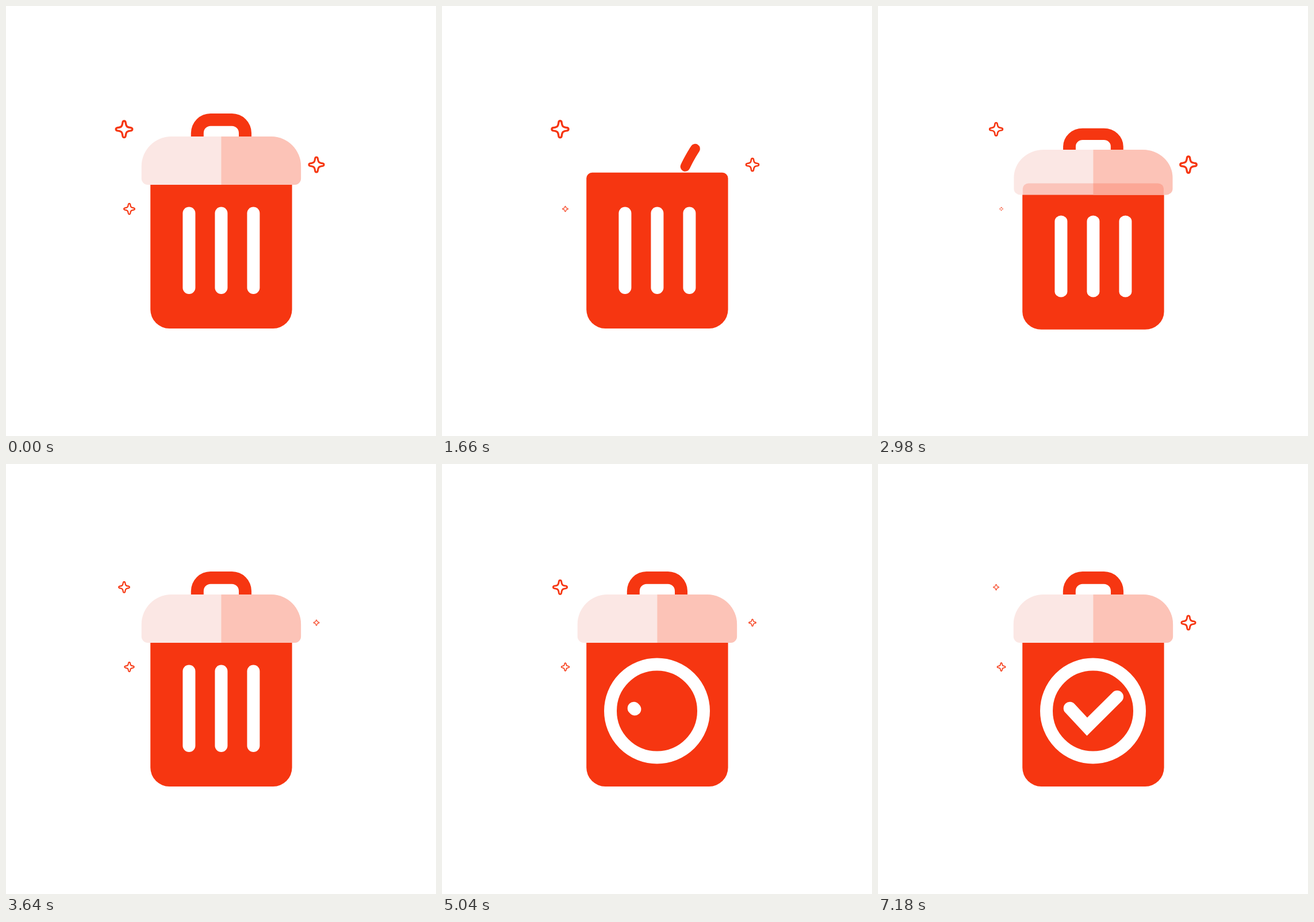
An HTML page with a canvas that plays this animation: 748 px wide and 748 px high, repeating every 7200 ms.

```html
<!DOCTYPE html>
<html lang="en">
<head>
<meta charset="utf-8">
<title>Bin</title>
<style>
html, body { margin: 0; width: 100%; height: 100%; overflow: hidden; background: #fff; }
canvas { display: block; }
</style>
</head>
<body>
<canvas id="stage" width="748" height="748"></canvas>
<script>
const ctx = document.getElementById('stage').getContext('2d');
const LOOP = 7200, RED = '#f63611', WHITE = '#fff';
const MID = 374.4;

const clamp = v => Math.max(0, Math.min(1, v));
const span = (t, a, b) => clamp((t - a) / (b - a));
const lerp = (a, b, p) => a + (b - a) * p;
const smooth = p => p * p * (3 - 2 * p);
const easeOut = p => 1 - (1 - p) ** 3;

// Linear pulse between two sizes, largest at "peak"
function pulse(t, peak, period, min, max) {
  const d = Math.abs((((t - peak) / period + 0.5) % 1 + 1) % 1 - 0.5) * 2;
  return lerp(max, min, d);
}

function stroke(color, width, cap = 'round') {
  ctx.strokeStyle = color;
  ctx.lineWidth = width;
  ctx.lineCap = cap;
  ctx.stroke();
}

function sparkle(x, y, size) {
  ctx.save();
  ctx.translate(x, y);
  ctx.scale(size / 16.5, size / 16.5);
  ctx.beginPath();
  ctx.moveTo(2.6, -12.4);
  for (let i = 0; i < 4; i++) {
    const a = i * Math.PI / 2, c = Math.cos(a), s = Math.sin(a);
    const curve = (...p) => {
      const q = [];
      for (let k = 0; k < 6; k += 2) q.push(p[k] * c - p[k + 1] * s, p[k] * s + p[k + 1] * c);
      ctx.bezierCurveTo(...q);
    };
    curve(3.6, -4.8, 4.8, -3.6, 12.4, -2.6);
    curve(15.6, -2, 15.6, 2, 12.4, 2.6);
  }
  ctx.closePath();
  stroke(RED, 3.5);
  ctx.restore();
}

function sparkles(t) {
  sparkle(205.5, 214.3, pulse(t, 40, 1600, 4.5, 16.5));
  sparkle(540, 276, pulse(t, 1325, 1530, 5, 18));
  sparkle(214.5, 353, t < 660 ? 10.5 : pulse(t, 2220, 1560, 3.3, 10.5));
}

function bodyPath() {
  ctx.beginPath();
  ctx.roundRect(251.2, 289.7, 246.4, 271.3, [10, 10, 33, 33]);
}

function lidPath() {
  ctx.beginPath();
  ctx.roundRect(235.7, 227, 277.4, 84, [52, 52, 11, 11]);
}

function handle() {
  ctx.beginPath();
  ctx.roundRect(321.8, 187, 105.2, 40.3, [34, 34, 0, 0]);
  ctx.roundRect(343.8, 208.7, 61.2, 18.6, [12, 12, 0, 0]);
  ctx.fillStyle = RED;
  ctx.fill('evenodd');
}

function lid(t) {
  if (t > 720 && t < 2740) return;
  const leaving = t < 1500;
  const size = leaving ? 1 : easeOut(span(t, 2740, 3030));
  const tint = leaving ? 0 : clamp((3060 - t) / 400);
  ctx.save();
  ctx.save();
  if (leaving) {
    ctx.globalAlpha = 1 - span(t, 400, 720);
    ctx.translate(0, -49 * smooth(span(t, 60, 560)));
  }
  ctx.translate(MID, 311);
  ctx.scale(size, size);
  ctx.translate(-MID, -311);
  handle();
  lidPath();
  ctx.fillStyle = '#fbe7e4';
  ctx.fill();
  ctx.clip();
  ctx.fillStyle = '#fcc3b7';
  ctx.fillRect(MID, 220, 150, 100);
  if (tint > 0) {
    ctx.globalAlpha = tint;
    bodyPath();
    ctx.fillStyle = RED;
    ctx.fill();
  }
  ctx.restore();
  ctx.restore();
}

// Part of a quadratic curve that runs from a to b along it
function trail(t, start, pts) {
  const p = (t - start) / 600;
  if (p <= 0 || p >= 1) return;
  const a = clamp(p * 1.3 - 0.3), b = clamp(p * 1.3);
  const at = (u, k) => (1 - u) ** 2 * pts[k] + 2 * u * (1 - u) * pts[k + 2] + u * u * pts[k + 4];
  ctx.beginPath();
  for (let i = 0; i <= 16; i++) {
    const u = lerp(a, b, i / 16);
    ctx.lineTo(at(u, 0), at(u, 1));
  }
  stroke(RED, 17);
}

function trails(t) {
  for (const wave of [0, 700]) {
    trail(t, 1046 + wave, [372, 210, 372, 255, 372, 300]);
    trail(t, 1280 + wave, [476, 208, 439, 238, 414, 300]);
  }
}

function bar(x) {
  ctx.beginPath();
  ctx.moveTo(x, 360.5);
  ctx.lineTo(x, 490);
  stroke(WHITE, 22);
}

function emblem(t) {
  const open = smooth(span(t, 4140, 4540));
  if (open === 0) {
    const gap = 56 * (1 - smooth(span(t, 3800, 4140)));
    for (const k of [-1, 0, 1]) bar(MID + k * gap);
    return;
  }
  const grow = smooth(span(t, 4620, 5000));
  const r = lerp(64.6, 81, grow);
  ctx.beginPath();
  ctx.ellipse(374, lerp(425.2, 429.5, open), r * open, r, 0, 0, Math.PI * 2);
  stroke(WHITE, 22);
  if (open === 1 && grow === 0) {
    ctx.fillStyle = WHITE;
    ctx.fillRect(363, 353.9, 11, 10);
  }
  const drawn = smooth(span(t, 5000, 5480));
  if (drawn > 0) {
    ctx.beginPath();
    ctx.moveTo(333.7, 424.8);
    ctx.lineTo(363.7, 456.9);
    ctx.lineTo(416, 405);
    ctx.setLineDash([118 * drawn, 400]);
    stroke(WHITE, 22);
    ctx.setLineDash([]);
  }
}

function draw(t) {
  ctx.fillStyle = WHITE;
  ctx.fillRect(0, 0, 748, 748);
  sparkles(t);
  trails(t);

  const squash = smooth(span(t, 2760, 2980)) * (1 - smooth(span(t, 2990, 3300)));
  ctx.save();
  ctx.translate(0, 589);
  ctx.scale(1, 1 - 0.0625 * squash);
  ctx.translate(0, -589);
  bodyPath();
  ctx.fillStyle = RED;
  ctx.fill();
  emblem(t);
  lid(t);
  ctx.restore();
}

function frame() {
  draw(performance.now() % LOOP);
  requestAnimationFrame(frame);
}
frame();
</script>
</body>
</html>
```
